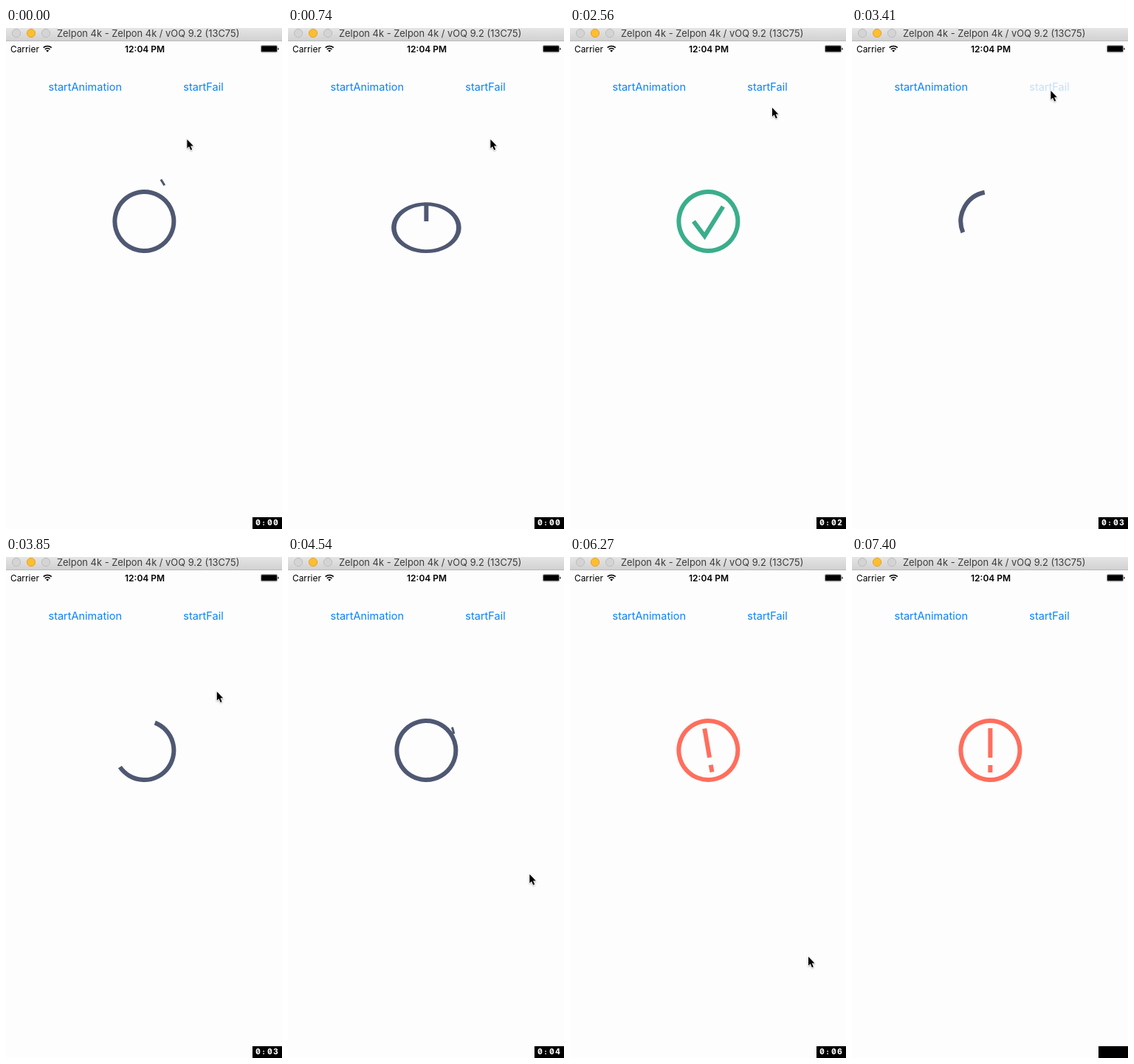
Recreate the animation shown at these times as an HTML page. Size 374 by 679 pixels, loop 7840 ms.

```html
<!DOCTYPE html>
<html lang="en">
<head>
<meta charset="utf-8">
<title>Loading ring</title>
<style>
  html, body { margin: 0; width: 100%; height: 100%; overflow: hidden; background: #fdfdfd; }
  svg { display: block; width: 374px; height: 679px; font-family: Inter, Roboto, sans-serif; }
  .link { fill: #0983fe; font-size: 14.5px; }
  #clock { fill: #fff; font: 800 10px Inter, "DejaVu Sans", sans-serif; font-feature-settings: "zero", "tnum"; }
</style>
</head>
<body>
<svg viewBox="0 0 374 679">
  <defs>
    <linearGradient id="bar" x2="0" y2="1">
      <stop stop-color="#e6e5e6"/><stop offset="1" stop-color="#d2d1d2"/>
    </linearGradient>
  </defs>
  <rect width="374" height="679" fill="#fdfdfd"/>

  <rect width="374" height="17" fill="url(#bar)"/>
  <rect y="17" width="374" height="1" fill="#bcbbbc"/>
  <g fill="#d5d4d5" stroke="#bebdbe">
    <circle cx="14" cy="7" r="5.6"/>
    <circle cx="34" cy="7" r="5.6" fill="#fdbe2f" stroke="#e2a52d"/>
    <circle cx="54" cy="7" r="5.6"/>
  </g>
  <text x="69" y="12" font-size="12.9" fill="#3c3c3c">Zelpon 4k - Zelpon 4k / vOQ 9.2 (13C75)</text>

  <text x="6" y="32.5" font-size="11.9">Carrier</text>
  <g fill="none" stroke="#000" stroke-width="1.7">
    <path d="M50.7 26.7a8 8 0 0 1 11 0M52.8 29a5 5 0 0 1 6.8 0"/>
    <path d="M54.3 30.6a2.8 2.8 0 0 1 3.8 0L56.2 32.8Z" fill="#000" stroke="none"/>
  </g>
  <text x="161" y="32.5" font-size="12" font-weight="600">12:04 PM</text>
  <rect x="345.3" y="23.6" width="22.4" height="9.4" rx="1.8" fill="none" stroke="#000" stroke-width=".5" stroke-opacity=".7"/>
  <rect x="346" y="24.3" width="21" height="8" rx="1"/>
  <path d="M368.3 26.6q1.3 .4 1.3 1.7t-1.3 1.7z"/>

  <text class="link" x="57.5" y="85">startAnimation</text>
  <text class="link" x="240.3" y="85" id="fail">startFail</text>

  <g id="badge" fill="none" stroke-width="6">
    <path id="ring"/>
    <path id="mark"/>
    <path id="spark" stroke-width="3"/>
  </g>

  <path id="cursor" d="M.4 1V13L3.1 10.5L5.3 15.4L7.2 14.6L5.1 9.7H8.8Z"
    stroke="#fff" stroke-width="1.2" paint-order="stroke"
    style="filter:drop-shadow(0 1px 1px rgba(0,0,0,.3))"/>

  <rect x="334" y="663" width="40" height="16"/>
  <text id="clock" x="338.3 347.7 354.3 362.3" y="674.2"></text>
</svg>
<script>
const LOOP = 7840;
const CX = 187.4, CY = 262, R = 40;
const DARK = '#4f5872', GREEN = '#3aae8b', RED = '#ff6e5d';

// The picture is held between these moments.
const TICKS = [0,
  150, 300, 440, 590, 740, 890, 1000, 1140,
  1290, 1430, 1580, 1720, 1860, 2000, 2130, 2270,
  2410, 2550, 2700, 2840, 2980, 3120, 3270, 3410,
  3550, 3690, 3830, 3970, 4110, 4260, 4400, 4540,
  4690, 4830, 4970, 5110, 5250, 5390, 5530, 5680,
  5830, 5970, 6110, 6250, 6390, 6530, 6670, 6810, 7400];

// time, x, y of the pointer tip
const POINTER = [
  [0, 245, 150], [740, 274, 150], [1580, 278, 129], [2130, 277, 124],
  [3120, 269, 84], [3550, 269, 84], [4540, 327, 429], [5530, 324, 526], [6600, 322, 548]];

const $ = id => document.getElementById(id);
const span = (t, from, to) => Math.min(1, Math.max(0, (t - from) / (to - from)));
const mix = (a, b, p) => a + (b - a) * p;
const line = (x1, y1, x2, y2) => `M${x1} ${y1}L${x2} ${y2}`;

// Clockwise arc, angles in degrees.
function arc(cx, cy, r, from, sweep) {
  sweep = Math.min(sweep, 359.99);
  const at = deg => {
    const a = deg * Math.PI / 180;
    return `${cx + r * Math.cos(a)} ${cy + r * Math.sin(a)}`;
  };
  const close = sweep > 359.9 ? 'Z' : '';
  return `M${at(from)}A${r} ${r} 0 ${sweep > 180 ? 1 : 0} 1 ${at(from + sweep)}${close}`;
}

function ringPath(p) {
  return arc(CX, CY, R, 540 - 540 * p, 90 + 270 * p);
}

// A short dash thrown from the right of the ring to a point above it.
function sparkPath(p) {
  const reach = Math.asin(0.8) * 180 / Math.PI;
  const tail = Math.max(0, p - 0.1);
  return arc(CX - 1.5 * R, CY, 2.5 * R, -reach * p, reach * (p - tail));
}

function fallPath(p) {
  const top = mix(CY - 2 * R, CY - R - 18, p);
  return line(CX, top, CX, top + 15);
}

function spokes(p) {
  const dx = R * Math.cos(Math.PI / 6), dy = R / 2;
  const spoke = side => line(CX + side * dx, CY + dy, CX + side * dx * (1 - p), CY + dy * (1 - p));
  return p > 0 ? spoke(-1) + spoke(1) : '';
}

function tickPath(p) {
  const pts = [[CX - 20, CY], [CX - 5, CY + 20], [CX + 20, CY - 20]];
  const first = 25, second = Math.hypot(25, 40);
  const len = p * (first + second);
  const toward = (a, b, k) => `L${mix(a[0], b[0], k)} ${mix(a[1], b[1], k)}`;
  return `M${pts[0]}` + toward(pts[0], pts[1], Math.min(1, len / first)) +
    (len > first ? toward(pts[1], pts[2], (len - first) / second) : '');
}

function alertPath(p) {
  const top = CY - R, bottom = CY + R;
  return line(CX, top + 10 * p, CX, top + 50 * p) +
    line(CX, bottom - 10 * p, CX, bottom - 20 * p);
}

function pose(t) {
  const s = { color: DARK, ring: 1, mark: '', spark: '', squash: 0, turn: 0 };
  const launch = start => {
    const p = span(t, start, start + 500);
    if (p > 0 && p < 1) s.spark = sparkPath(p);
    else if (p === 1) s.spark = fallPath(span(t, start + 500, start + 650));
  };

  if (t < 326) launch(-324);
  else if (t < 1435) {
    const press = span(t, 326, 720), release = span(t, 745, 1000);
    s.squash = press - release;
    const ringTop = CY - R - 3 + 17.2 * s.squash;
    const top = press < 1 ? mix(CY - R - 18, ringTop + 2, press) : ringTop + 2;
    s.mark = line(CX, top, CX, mix(CY - R - 3, CY, press)) + spokes(release);
  } else if (t < 3369) {
    s.color = GREEN;
    s.mark = tickPath(span(t, 1435, 2240));
  } else if (t < 5054) {
    s.ring = span(t, 3369, 4369);
    launch(4369);
  } else {
    s.color = RED;
    s.mark = alertPath(span(t, 5054, 5874));
    const shake = span(t, 5874, 6750);
    s.turn = 10 * Math.sin(shake * Math.PI * 8);
  }
  return s;
}

function pointerAt(t) {
  let i = POINTER.findIndex(k => k[0] > t);
  if (i < 0) i = POINTER.length - 1;
  const [a, b] = [POINTER[i - 1], POINTER[i]];
  const p = span(t, a[0], b[0]);
  return [mix(a[1], b[1], p), mix(a[2], b[2], p)];
}

function render(t) {
  const s = pose(t), base = CY + R + 3;
  $('badge').setAttribute('stroke', s.color);
  $('badge').setAttribute('transform', `rotate(${s.turn} ${CX} ${CY})`);
  $('ring').setAttribute('d', ringPath(s.ring));
  $('ring').setAttribute('transform', `translate(${CX} ${base}) ` +
    `scale(${1 + 0.1 * s.squash} ${1 - 0.2 * s.squash}) translate(${-CX} ${-base})`);
  $('mark').setAttribute('d', s.mark);
  $('spark').setAttribute('d', s.spark);

  $('fail').setAttribute('opacity', t < 3270 ? 1 : mix(0.2, 1, span(t, 3400, 3640)));
  $('cursor').setAttribute('transform', `translate(${pointerAt(t)})`);
  $('cursor').setAttribute('visibility', t < 6670 ? 'visible' : 'hidden');
  $('clock').textContent = t < 7400 ? '0:0' + Math.floor(t / 1000) : '';
}

const origin = performance.now();
let shown = -1;
function frame() {
  const t = (performance.now() - origin) % LOOP;
  const tick = TICKS.findLast(k => k <= t) ?? 0;
  if (tick !== shown) render(shown = tick);
  requestAnimationFrame(frame);
}
frame();
</script>
</body>
</html>
```
